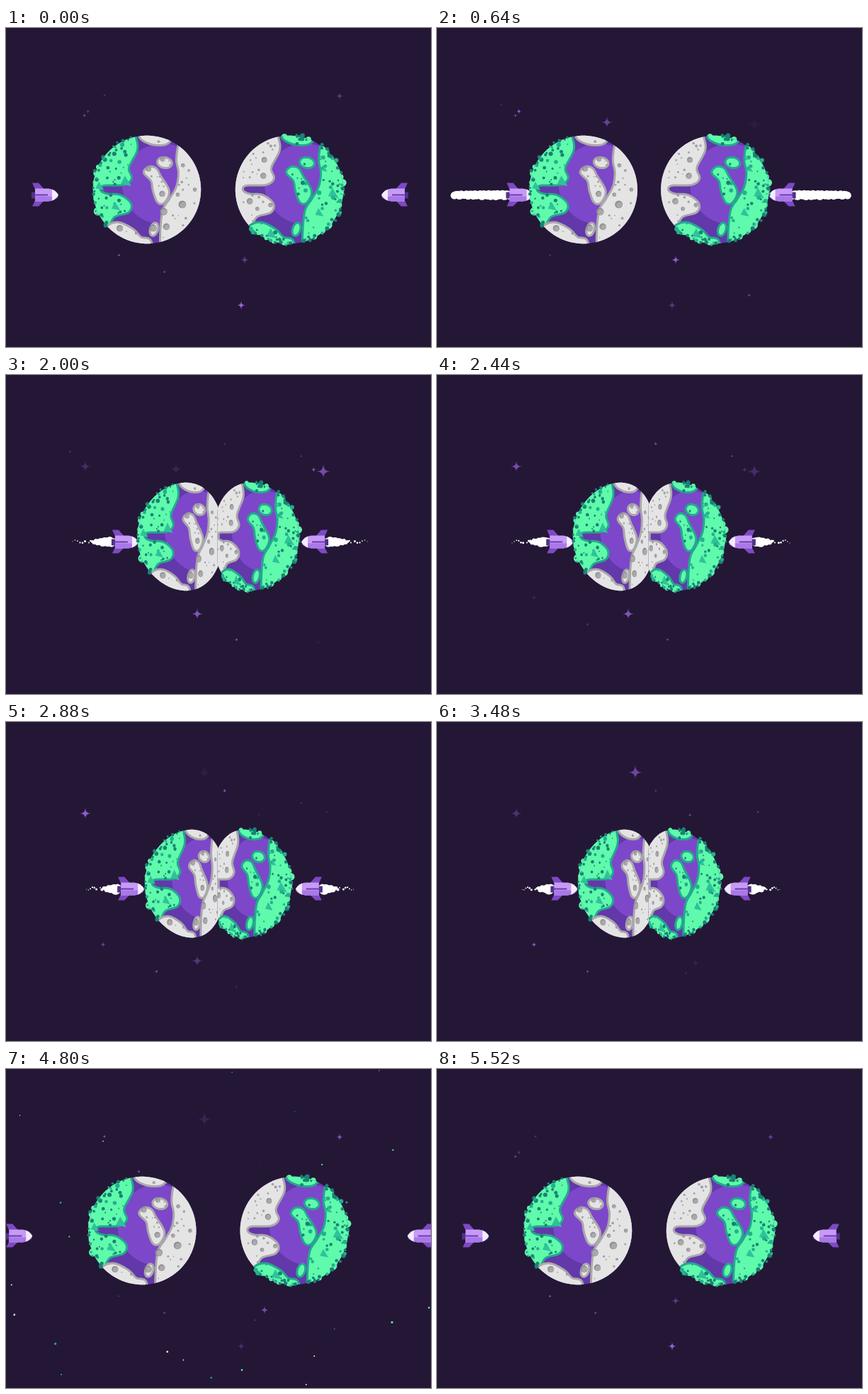
Recreate the animation shown at these times as an HTML page with a canvas. Size 600x450 px, loop 5560 ms.

```html
<!DOCTYPE html>
<html>
<head>
<meta charset="utf-8">
<style>
html, body { margin: 0; width: 100%; height: 100%; overflow: hidden; background: #241735; }
canvas { display: block; }
</style>
</head>
<body>
<canvas id="stage" width="600" height="450"></canvas>
<script>
const ctx = document.getElementById('stage').getContext('2d');
const LOOP = 5560, IGNITE = 160, TOUCH = 545, MERGE = 3960, SPLIT = 4480;
const R = 77, MID = 299.5, CY = 228, TAU = Math.PI * 2;
const GREEN = { fill: '#5ffaab', rim: '#22a98f' };
const WHITE = { fill: '#e5e4e5', rim: '#aaa8aa' };

let seed = 11;
const rnd = () => (seed = (seed * 16807) % 2147483647) / 2147483647;
const clamp = v => Math.max(0, Math.min(1, v));
const polar = (a, r) => [r * Math.cos(a), r * Math.sin(a)];
const list = (n, make) => Array.from({ length: n }, (_, i) => make(i));

// A shoreline closed by an arc outside the planet's edge
function coast(...shore) {
  const angle = ([x, y]) => Math.atan2(y, x);
  const from = angle(shore[shore.length - 1]);
  const turn = Math.atan2(Math.sin(angle(shore[0]) - from), Math.cos(angle(shore[0]) - from));
  return [...shore, ...list(5, i => polar(from + turn * i / 4, 90))];
}

const oval = (x, y, rx, ry, tilt) => list(8, i => {
  const [p, q] = polar(i * TAU / 8, 1);
  return [x + p * rx * Math.cos(tilt) - q * ry * Math.sin(tilt), y + p * rx * Math.sin(tilt) + q * ry * Math.cos(tilt)];
});

// Key points relative to the planet's centre
const outlines = {
  west: coast([-17,-74], [-15,-56], [-27,-31], [-23,-16], [-34,-8], [-62,-7], [-67,1], [-58,7], [-38,9],
    [-24,20], [-27,31], [-46,37], [-55,50]),
  southwest: coast([-52,50], [-38,48], [-20,57], [-9,68], [4,72]),
  north: coast([-9,-74], [4,-66], [20,-64], [31,-68]),
  islet: oval(25, -38, 9, 6, .2),
  island: [[-3,-24], [3,-31], [12,-29], [18,-19], [30,2], [24,17], [16,17], [10,2], [7,-13]],
  south: oval(10, 56, 4, 8, .3),
  east: coast([46,-64], [43,-42], [46,-24], [43,-4], [33,14], [23,32], [20,74])
};

function smooth(p, steps = 6) {
  const out = [], n = p.length;
  for (let i = 0; i < n; i++) {
    const [a, b, c, d] = [-1, 0, 1, 2].map(k => p[(i + k + n) % n]);
    for (let s = 0; s < steps; s++) {
      const t = s / steps;
      out.push([0, 1].map(j => b[j] + .5 * t * (c[j] - a[j] +
        t * (2 * a[j] - 5 * b[j] + 4 * c[j] - d[j] + t * (3 * (b[j] - c[j]) + d[j] - a[j])))));
    }
  }
  return out;
}

const lands = Object.entries(outlines).map(([name, p]) => {
  const points = smooth(p), path = new Path2D();
  points.forEach(([x, y]) => path.lineTo(x, y));
  return { name, points, path, bumps: [], hills: [], trees: [], craters: [] };
});

// Scatter details over the lands between two distances from the centre
function scatter(kind, count, near, far, small, large, power, gap) {
  for (let i = 0; i < count; i++) {
    const [x, y] = polar(rnd() * TAU, Math.sqrt(near * near + rnd() * (far * far - near * near)));
    const r = small + (large - small) * rnd() ** power;
    const spots = lands.find(l => ctx.isPointInPath(l.path, x, y))?.[kind];
    if (spots?.every(s => Math.hypot(s.x - x, s.y - y) > (s.r + r) * gap))
      spots.push({ x, y, r, dark: rnd() < .6 });
  }
}
scatter('bumps', 40, 72, 76, 3, 6, 1, .5);
scatter('hills', 24, 0, 70, 6, 11, 1, 1.6);
scatter('trees', 190, 0, 74, 1, 3.2, 2, .8);
scatter('trees', 90, 73, 79, 1.2, 3.4, 1, .5);
scatter('craters', 70, 0, 68, 2.5, 5.5, 1.5, 1.8);
scatter('craters', 150, 0, 72, .7, 2, 1, 1.5);

function fillPoly(points, color) {
  ctx.beginPath();
  points.forEach(p => ctx.lineTo(p[0], p[1]));
  ctx.closePath();
  ctx.fillStyle = color;
  ctx.fill();
}

function dot(x, y, rx, ry, color) {
  ctx.fillStyle = color;
  ctx.beginPath();
  ctx.ellipse(x, y, Math.max(rx, 0), Math.max(ry, 0), 0, 0, TAU);
  ctx.fill();
}

// side: 1 is pressed on its right, -1 on its left, 0 is round
function planet(c, side, isGreen) {
  const room = Math.min(R, Math.abs(MID - c));
  const press = side ? .4 * (1 - room / R) : 0;
  const wall = Math.abs(MID - c) + .8;
  const warp = ([u, v]) => {
    if (!side) return [c + u, CY + v, 1];
    const d = u * side + R;
    const w = d - press * d * Math.abs(d) / (2 * R) - R;
    return [c + side * Math.min(w, wall), CY + v, Math.max(.3, 1 - press * d / R)];
  };
  const ring = (x, y, r) => list(90, i => {
    const [p, q] = polar(i * TAU / 90, r);
    return warp([x + p, y + q]);
  });
  const spot = (s, color) => {
    const [x, y, k] = warp([s.x, s.y]);
    dot(x, y, s.r * k, s.r, color);
  };
  const hill = ({ x, y, r }) =>
    fillPoly([[x - r * .7, y + r * .4], [x - r * .1, y - r * .8], [x + r * .8, y + r * .7]].map(warp), '#2fc29a');
  const green = lands.filter(l => isGreen(l.name));

  green.forEach(l => l.bumps.forEach(s => spot(s, GREEN.fill)));
  ctx.save();
  fillPoly(ring(0, 0, R - .8), '#6338aa');
  ctx.clip();
  fillPoly(ring(22, -8, 57), '#7d47ca');
  for (const land of lands) {
    const skin = green.includes(land) ? GREEN : WHITE, points = land.points.map(warp);
    fillPoly(points, skin.rim);
    ctx.strokeStyle = skin.rim;
    ctx.lineWidth = 6;
    ctx.lineJoin = 'round';
    ctx.stroke();
    fillPoly(points, skin.fill);
    if (skin === WHITE) for (const s of land.craters) {
      spot(s, '#8f8d90');
      spot({ x: s.x + s.r * .15, y: s.y + s.r * .15, r: s.r * .8 }, '#aaa8aa');
    }
  }
  ctx.restore();
  for (const land of green) {
    land.hills.forEach(hill);
    land.trees.forEach(s => spot(s, s.dark ? '#178374' : '#24ae90'));
  }
}

function puffs(tail, y, length, t) {
  const taper = clamp((t - TOUCH) / 600), n = Math.ceil(length / 2.5);
  for (let i = 0; i <= n; i++) {
    const f = i / n, lump = Math.sin(i * 2.4 + t / 90);
    const plume = 9 * Math.min(1, .4 + f * 3) * (1 - f) ** .8;
    const r = (6.5 + (plume - 6.5) * taper) * (.87 + .13 * lump) * Math.min(1, length / 25);
    dot(tail - f * length + 3, y + 1.5 * lump, r, r, '#fff');
  }
  for (let i = 0; i < 6 * taper; i++) {
    const r = 1.5 - i * .2;
    dot(tail - length * (1 + i * .09), y + 2 * Math.sin(i * 5 + t / 90), r, r, '#fff');
  }
}

function rocket(nose, smoke, t) {
  const y = 235.5;
  if (smoke > 1) puffs(nose - 36, y - .5, smoke, t);
  ctx.save();
  ctx.translate(nose, y);
  const shape = (d, color) => {
    ctx.fillStyle = color;
    ctx.fill(new Path2D(d));
  };
  shape('M-38-4H-32V5H-38Z', '#51308a');
  shape('M-37-17H-28L-20-8H-33ZM-37 16H-28L-20 8H-33Z', '#7e49c4');
  shape('M-33-9H-14Q-4-8 0 0Q-4 8-14 9H-33Z', '#c69af6');
  shape('M-33 2H0Q-4 8-14 9H-33Z', '#a978e8');
  shape('M-9-8Q-3-5 0 0Q-3 5-9 8Z', '#f3ecfb');
  shape('M-34-1H-15V1H-34Z', '#6b3bab');
  ctx.restore();
}

// Centre of the left planet: pushed with fading force, rammed together, sprung apart
function centreAt(t) {
  if (t >= SPLIT) {
    const s = t - SPLIT;
    return 199 + (MID - 199) * Math.exp(-s / 120) * Math.cos(s / 95);
  }
  const pushed = 199 + 80 * (1 - Math.exp(-Math.max(0, t - TOUCH) / 950));
  return pushed + (MID - pushed) * clamp((t - 3700) / (MERGE - 3700)) ** 2;
}

function noseAt(t) {
  if (t < TOUCH) return 74 + 54 * clamp((t - IGNITE) / (TOUCH - IGNITE)) ** 2;
  if (t < MERGE) return centreAt(t) - R + 6 * (1 - clamp((t - TOUCH) / 2300));
  if (t < SPLIT) return 202 + 20.5 * Math.exp((MERGE - t) / 80);
  const s = t - SPLIT;
  return 74 + 128 * Math.exp(-s / 320) * Math.cos(s / 130);
}

function smokeAt(t) {
  if (t < IGNITE || t > MERGE + 120) return 0;
  if (t < TOUCH + 95) return (noseAt(t) - 55) * clamp((t - IGNITE) / 100);
  return (26 + 52 * Math.exp((TOUCH + 95 - t) / 1000)) * clamp((MERGE + 120 - t) / 120);
}

// Large stars light up in turn, small ones at random places beside the planets
const stars = [[332,391,6], [337,327,6], [240,133,8], [448,136,10], [270,337,8], [112,129,8], [137,314,4],
  [280,71,10], [365,340,6], [471,96,5]].map(([x, y, size], i, all) => ({ x, y, size, peak: i * LOOP / all.length }));
for (let i = 0; i < 16; i++) {
  const y = i % 3 ? 62 + 85 * rnd() : 318 + 80 * rnd();
  stars.push({ x: 90 + 400 * rnd(), y, size: 1.5 + 2.5 * rnd(), peak: i * LOOP / 16 });
}

function drawStars(t) {
  for (const { x, y, size, peak } of stars) {
    const d = Math.abs(t - peak);
    ctx.globalAlpha = Math.max(0, 1 - Math.min(d, LOOP - d) / 1100);
    ctx.fillStyle = '#9962df';
    ctx.beginPath();
    ctx.moveTo(x + size, y);
    for (let k = 1; k <= 4; k++) {
      const [dx, dy] = polar(k * TAU / 4, size);
      ctx.quadraticCurveTo(x, y, x + dx, y + dy);
    }
    ctx.fill();
  }
  ctx.globalAlpha = 1;
}

const debris = list(34, i =>
  ({ a: i * 2.4, reach: 130 + 210 * rnd(), r: 1.5 + 2.5 * rnd(), color: ['#e5e4e5', '#24ae90', '#5ffaab'][i % 3] }));

function burst(t, start, length) {
  const f = (t - start) / length;
  if (f <= 0 || f >= 1) return;
  for (const { a, reach, r, color } of debris) {
    const [x, y] = polar(a, 60 + reach * (1 - (1 - f) ** 2));
    dot(MID + x, CY + y, r * (1 - f), r * (1 - f), color);
  }
}

function draw(t) {
  ctx.fillStyle = '#241735';
  ctx.fillRect(0, 0, 600, 450);
  drawStars(t);
  const c = centreAt(t), nose = noseAt(t), smoke = smokeAt(t);
  rocket(nose, smoke, t);
  ctx.save();
  ctx.translate(604, 0);
  ctx.scale(-1, 1);
  rocket(nose, smoke, t);
  ctx.restore();
  burst(t, MERGE, 330);
  burst(t, SPLIT, 540);
  if (t >= MERGE && t < SPLIT) planet(300, 0, () => true);
  else {
    planet(c, 1, name => name === 'west');
    planet(2 * MID - c, -1, name => name !== 'west');
  }
}

const begin = performance.now();
function frame() {
  draw((performance.now() - begin) % LOOP);
  requestAnimationFrame(frame);
}
frame();
</script>
</body>
</html>
```
